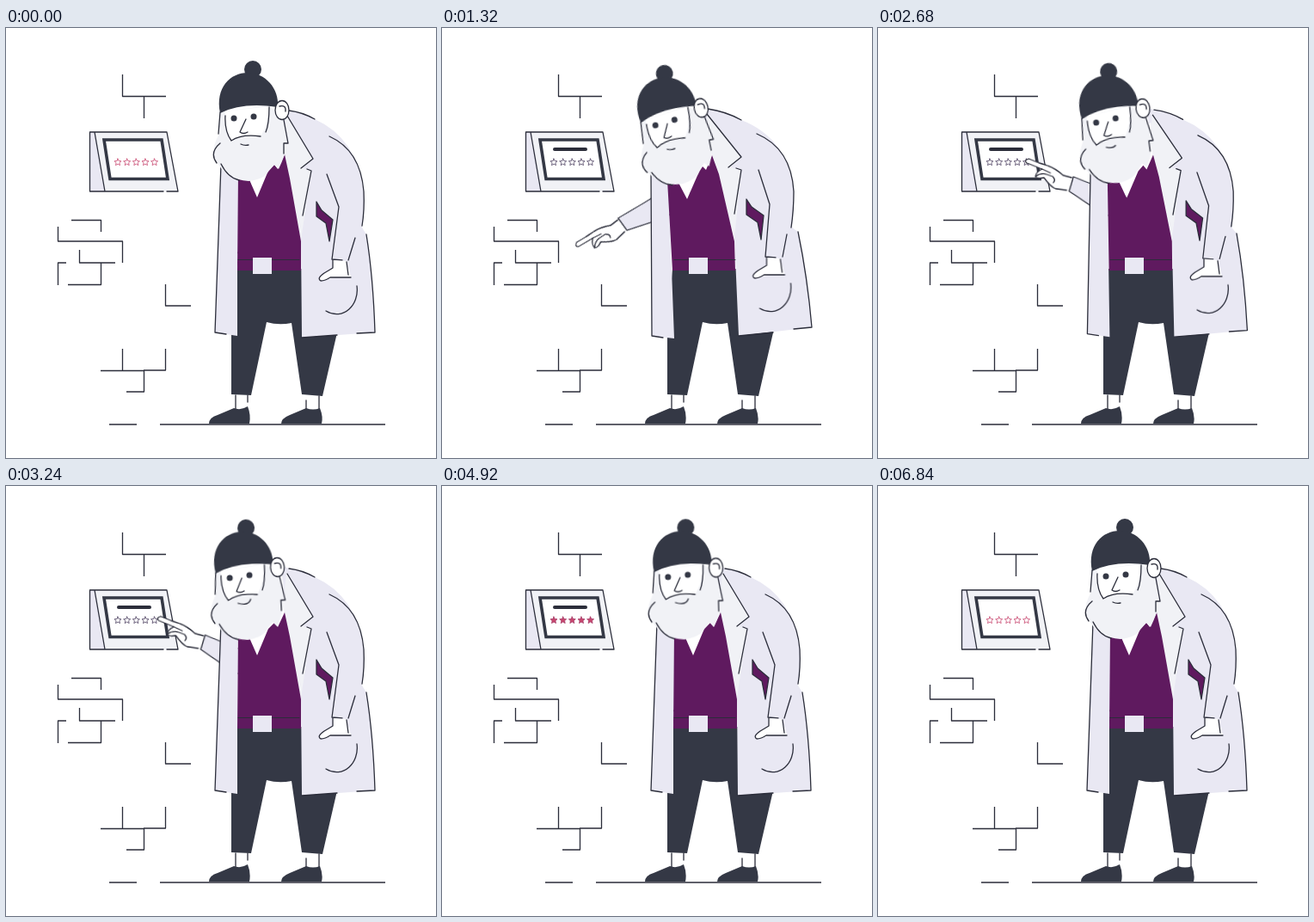
An HTML page without scripts that plays this animation: 500x500 px, repeating every 6.88 s.

```html
<!DOCTYPE html>
<html lang="en">
<head>
<meta charset="utf-8">
<title>Rating kiosk</title>
<style>
html, body { margin: 0; width: 100%; height: 100%; overflow: hidden; background: #fff; }
svg { display: block; width: 100vw; height: 100vh; }
svg {
  --lean: linear(0, 0 3%, .1 6%, .5 10.5%, .9 15%, 1 19%, 1 31%, .9 34%, .5 38%, .1 42%, 0 46%, 0);
  fill: none; stroke-linecap: round; stroke-linejoin: round;
}
.line { stroke: #2b2d3a; stroke-width: 1.3; }
.dark { fill: #343845; }
.coat { fill: #e9e8f3; }
.light { fill: #f1f2f6; }
.white { fill: #fff; }
.plum { fill: #5f1a5f; }

/* body parts that follow the lean */
.lean { animation: 6.88s var(--lean) infinite; }
#shirt { animation-name: shirt; }
#neck { animation-name: neck; }
#coat { animation-name: coat; }
#lapel { animation-name: lapel; }
#gap { animation-name: gap; }
#seams { animation-name: seams; }
#pocket { animation-name: pocket; }
@keyframes shirt { to { d: path("M262 177L265 174L268 179L274 178L285 199L299 167L303 161L307 165L314 148L322 170L340 248L341 282H268Z"); } }
@keyframes neck { to { d: path("M262 150L264 175L270 177L285 199L300 167L306 167L314 146L310 110Z"); } }
@keyframes coat { to { d: path("M300 92L309 94Q330 97 348 107Q402 128 409 190Q409 212 407 232L414 237Q425 290 430 348L345 358L340 244L314 148ZM243 160L244 358L270 361L267 281L262 160Z"); } }
@keyframes lapel { to { d: path("M308 98L348 150L335 162L348 165L340 244L314 148L308 120Z"); } }
@keyframes gap { to { d: path("M354 199L360 208L374 218L371 246L367 226L354 217Z"); } }
@keyframes seams { to { d: path("M309 94Q330 97 348 107M366 123Q406 140 409 190Q409 212 406 232M414 237Q425 290 430 348L409 350M385 354L345 358M308 100L348 150L333 162M342 163L348 165L340 216M368 165L381 205L376 266L388 267M401 240L396 266M243 168L244 358L257 360"); } }
@keyframes pocket { to { transform: translate(-2.5px, -3px); } }

#head { transform-origin: 298px 195px; animation: head 6.88s ease-in-out infinite; }
@keyframes head {
  0%, 3% { transform: rotate(0); }
  18.5%, 27% { transform: rotate(-11.2deg); }
  32.5% { transform: rotate(-10.7deg); }
  46.5% { transform: rotate(-3.1deg); }
  59%, 64% { transform: rotate(-2.4deg); }
  76%, 81% { transform: rotate(-1deg); }
  93%, 100% { transform: rotate(0); }
}

#mouth { animation: smile 6.88s ease-in-out infinite; }
@keyframes smile {
  0%, 35%, 91%, 100% { d: path("M273 135Q277 137 282 136"); }
  45%, 81% { d: path("M273 135Q285 139 288 131"); }
}

#arm { animation: reach 6.88s infinite; }
@keyframes reach {
  0%, 11% { transform: translate(275px, 262px) rotate(-115deg); animation-timing-function: ease-in; }
  19.2% { transform: translate(209px, 230px) rotate(-49deg); animation-timing-function: ease-out; }
  23.8%, 26.2% { transform: translate(186px, 181px) rotate(0deg); animation-timing-function: ease-in; }
  32.6% { transform: translate(206px, 181px) rotate(0deg); animation-timing-function: ease-out; }
  43%, 48% { transform: translate(227px, 182px) rotate(4deg); animation-timing-function: ease-in-out; }
  55%, 64% { transform: translate(225px, 183px) rotate(3deg); animation-timing-function: ease-in-out; }
  71%, 100% { transform: translate(275px, 262px) rotate(-115deg); }
}

#stars { fill: #fff; stroke: #c8476f; stroke-width: .8; animation: rate 6.88s infinite; }
@keyframes rate {
  0%, 5% { fill: #fff; stroke: #c8476f; }
  12%, 51% { fill: #fff; stroke: #4c3f60; }
  59%, 64% { fill: #a890bb; stroke: #4c3f60; }
  70%, 81% { fill: #c8476f; stroke: #a53c68; }
  91%, 100% { fill: #fff; stroke: #c8476f; }
}
#title { animation: title 6.88s infinite; }
@keyframes title {
  0%, 5%, 91%, 100% { opacity: 0; }
  12%, 82% { opacity: 1; }
}
</style>
</head>
<body>
<svg viewBox="0 0 500 500">
  <defs>
    <path id="star" d="M0-4L1.2-1.4 4-1.2 1.9.7 2.5 3.6 0 2.1-2.5 3.6-1.9.7-4-1.2-1.2-1.4Z"/>
  </defs>

  <!-- wall and floor -->
  <path class="line" stroke-linecap="butt" d="M135.5 54V79.5H186M160.5 79.5V105M76 223.5H110.5V237M60.5 231V248H135.5V273M85.5 258V273H127M70 273H60.5V299M72 298.5H110.5V273M185.5 298V323H215M135.5 373V398M110 398.5H160.5V423H140M185.5 373V398H160M120 461H152M179 461H441"/>

  <!-- kiosk -->
  <path class="coat" d="M97.5 121H187L200 190H97.5Z"/>
  <path class="light" d="M103 121H187L200 190H115Z"/>
  <path class="line" d="M183 190H97.5V121H187L200 190H187M103 121L115 190"/>
  <path class="white" stroke="#343845" stroke-width="3.6" stroke-linejoin="miter" d="M114 130H181L188 175.5H121Z"/>
  <path id="title" stroke="#2b2d3a" stroke-width="4" d="M131 141H167"/>
  <g id="stars">
    <use href="#star" x="130" y="156"/>
    <use href="#star" x="140.7" y="156"/>
    <use href="#star" x="151.3" y="156"/>
    <use href="#star" x="162" y="156"/>
    <use href="#star" x="172.6" y="156"/>
  </g>

  <!-- reaching arm, origin at the cuff -->
  <g id="arm" class="line">
    <path class="white" d="M2-8L-8-10Q-18-18-26-20Q-33-22-37-23L-49-27Q-55-25-51-22L-33-16Q-40-12-40-7Q-38-4-30-6Q-22 4-16 6L-3 7"/>
    <path d="M-33-16L-23-12M-40-7Q-34-12-27-10L-20-8Q-16-4-19-1"/>
    <path class="coat" d="M4-9L37 2L85 17L80 46L37 30L0 8Z"/>
  </g>

  <!-- legs -->
  <path class="dark" d="M268 280H345L386 350L368 428L344 426L332 343Q317 346 303 342L285 427L262 426V350Z"/>
  <path class="line" d="M267 427V443M281 427V435M349 433V443M364 428V443"/>
  <path class="dark" d="M236 460Q236 453 246 450L265 442Q273 445 281 440Q285 450 283 460ZM320 460Q320 454 330 450L349 442Q357 445 365 442Q369 452 367 460Z"/>

  <!-- torso -->
  <path id="coat" class="coat lean" d="M320 92L329 96Q345 98 359 106Q408 128 416 190Q417 212 414 232L419 240Q427 290 429 354L344 360L343 246L325 148ZM250 150L243 354L269 358L269 281L270 150Z"/>
  <path id="neck" class="white lean" d="M270 140L272 167L281 173L292 197L305 166L316 166L325 146L322 110Z"/>
  <path id="lapel" class="light lean" d="M326 100L357 152L345 163L355 166L343 246L323 148L324 120Z"/>
  <path id="shirt" class="plum lean" d="M270 168L273 166L275 173L281 172L292 197L305 166L312 159L316 164L324 147L330 175L343 248L343 282H269Z"/>
  <path stroke="#2b2d3a" d="M270 269.5H287M309 269.5H341"/>
  <path class="coat" d="M287 267H309V286H287Z"/>
  <path id="gap" class="plum line lean" d="M361 202L367 212L380 223L376 248L372 227L361 219Z"/>
  <path id="seams" class="line lean" d="M329 96Q345 98 359 106M376 126Q412 142 416 190Q417 212 414 230M419 240Q427 290 429 354L408 355M385 357L344 360M327 102L357 152L343 163M350 164L355 166L345 218M373 170L387 208L379 269L391 270M406 244L398 270M250 158L243 354L256 356"/>
  <g id="pocket" class="line lean">
    <path class="white" stroke="none" d="M380 270L380 279L370 285Q362 291 365 294L384 290H401L396 271Z"/>
    <path d="M380 270L380 279L370 285Q361 291 366 294Q371 294 377 290H401M396 272L398 287M408 300C411 322 392 341 372 329"/>
  </g>

  <!-- head -->
  <g id="head">
    <path class="light" d="M249 98L247 125Q236 145 246 157Q256 176 282 178Q300 176 305 167L312 159L317 164Q325 147 328 134L322 105L306 90Z"/>
    <path class="white" d="M255 97Q253 120 262 131Q275 124 296 126Q305 112 306 91Z"/>
    <path class="line" d="M249 98L247 123M249 134Q236 145 245 157M250 158Q258 174 271 177M323 107L328 134H323V146M255 102Q254 120 262 131Q274 123 296 126M306 92Q306 112 302 121M279 106L272 121Q276 124 281 121"/>
    <path id="mouth" class="line" d="M273 135Q277 137 282 136"/>
    <g class="dark">
      <circle cx="265" cy="105" r="3.5"/>
      <circle cx="288" cy="103" r="3.5"/>
      <circle cx="287" cy="48" r="10"/>
      <path d="M249 99C243 69 261 52 281 52S318 70 316 92Q275 86 249 99Z"/>
    </g>
    <ellipse class="white line" cx="321" cy="95.5" rx="8" ry="11"/>
    <path class="line" d="M318 91Q326 89 325 97"/>
  </g>
</svg>
</body>
</html>
```
